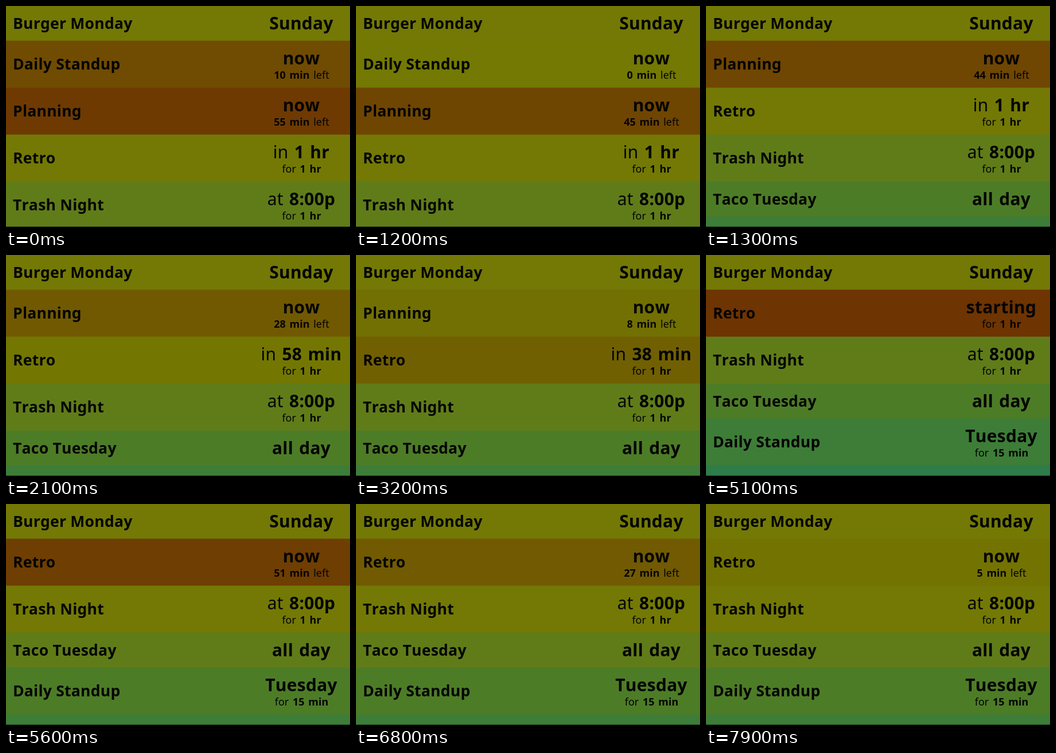
Write an HTML page that moves like this. It is 600x386 px and loops after 8 s.

```html
<!DOCTYPE html>
<html lang="en">
<head>
<meta charset="utf-8">
<title>Upcoming events</title>
<style>
html, body { margin: 0; width: 100%; height: 100%; overflow: hidden; background: #2f7b4a; }
svg { display: block; width: 600px; height: 386px; }
text { font-family: "Noto Sans", "Open Sans", sans-serif; fill: #040400; font-kerning: none; }
.name { font-size: 26.5px; font-weight: 700; letter-spacing: .25px; }
.when { font-size: 30px; text-anchor: middle; letter-spacing: .25px; word-spacing: .07em; }
.span { font-size: 18px; text-anchor: middle; word-spacing: .11em; }
.b { font-weight: 700; }
</style>
</head>
<body>
<svg id="stage" viewBox="0 0 600 386"></svg>
<script>
const LOOP = 8000, STEP = 100;
const stage = document.getElementById("stage");

// Simulated minutes at chosen steps, linear in between.
const clock = [[0, 0], [12, 10], [21, 27], [36, 55], [37, 58], [51, 85], [56, 94], [80, 142]];

// Start and end are in simulated minutes; other events only carry a label.
const events = [
  { name: "Burger Monday", when: "<b>Sunday" },
  { name: "Daily Standup", start: -5, end: 10 },
  { name: "Planning", start: -5, end: 55 },
  { name: "Retro", start: 85, end: 145, span: "for <b>1 hr" },
  { name: "Trash Night", when: "at <b>8:00p", span: "for <b>1 hr" },
  { name: "Taco Tuesday", when: "<b>all day" },
  { name: "Daily Standup", when: "<b>Tuesday", span: "for <b>15 min" },
  { name: "", when: "" }
];
const cool = ["#737904", "#607c19", "#4d7c27", "#3d7d38", "#2f7b4a"];

function minutesAt(step) {
  const i = clock.findIndex(([s]) => s > step);
  const [s0, m0] = clock[i - 1], [s1, m1] = clock[i];
  return Math.floor(m0 + (m1 - m0) * (step - s0) / (s1 - s0) + 1e-6);
}

const warm = heat => `rgb(${115 - 5 * heat},${121 - 69 * heat},2)`;

function bold(label) {
  const [plain, strong = "", rest = ""] = label.split(/<b>|<\/b>/);
  return `${plain}<tspan class="b">${strong}</tspan>${rest}`;
}

const text = (cls, x, y, label) => `<text class="${cls}" x="${x}" y="${y}">${bold(label)}</text>`;

// Adds the current labels, and the heat of an event that is close or running.
function status(e, now) {
  if (e.start === undefined) return { ...e, heat: 0 };
  const wait = e.start - now, left = e.end - now;
  if (wait < 0) return {
    ...e, running: true, heat: left / (e.end - e.start),
    when: "<b>now", span: `<b>${left} min</b> left`
  };
  const when = wait >= 60 ? "in <b>1 hr" : wait ? `in <b>${wait} min` : "<b>starting";
  return { ...e, when, heat: Math.max(0, 1 - wait / 60) };
}

function draw(step) {
  const now = minutesAt(step);
  let y = 0, rank = 0, out = "";
  events.filter(e => e.end === undefined || e.end >= now).forEach((e, i) => {
    const s = status(e, now), height = s.span ? 82 : 61;
    const fill = s.heat || s.running ? warm(s.heat) : cool[Math.min(rank, 4)];
    if (i && !s.running) rank++;
    out += `<rect y="${y - 0.4}" width="600" height="${height + 1}" fill="${fill}"/>`
      + text("name", 12, y + (s.span ? 50 : 40), s.name)
      + text("when", 515, y + 40.5, s.when)
      + (s.span ? text("span", 515.5, y + 66, s.span) : "");
    y += height;
  });
  stage.innerHTML = out + '<rect y="385" width="600" height="1" fill="#000" opacity=".55"/>';
}

let shown = -1;
function tick() {
  const step = Math.floor(performance.now() % LOOP / STEP);
  if (step !== shown) draw(shown = step);
  requestAnimationFrame(tick);
}
tick();
</script>
</body>
</html>
```
